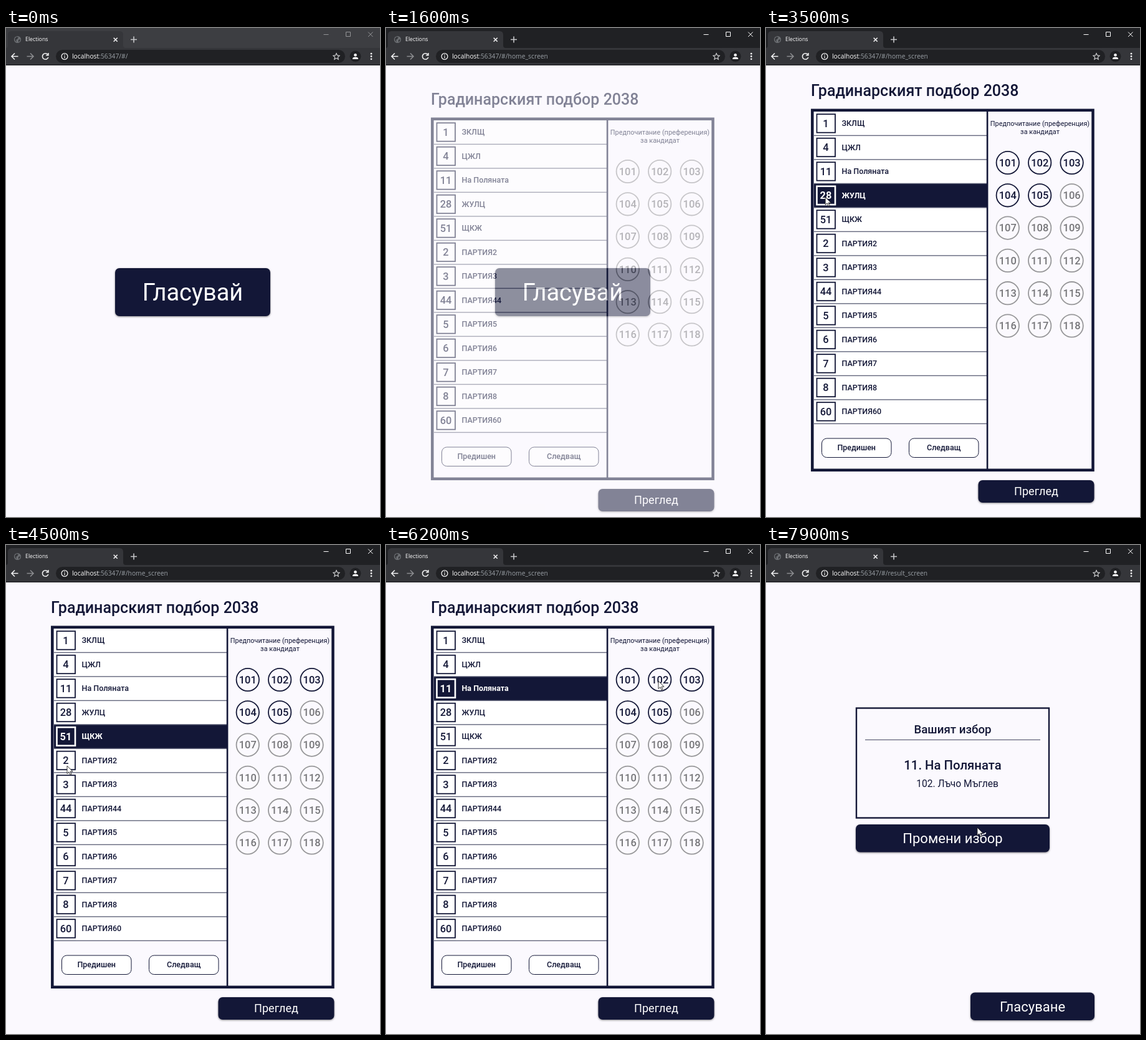
Recreate the animation shown at these times as an HTML page. Size 600 by 784 pixels, loop 8 s.

```html
<!DOCTYPE html>
<html lang="bg">
<head>
<meta charset="utf-8">
<title>Elections</title>
<style>
html, body { margin: 0; width: 100%; height: 100%; overflow: hidden; background: #fbf9fe; }
svg { display: block; width: 600px; height: 784px; --navy: #131737; --bg: #fbf9fe; }
text { font-family: Roboto, sans-serif; fill: var(--navy); white-space: pre; }
.mid { text-anchor: middle; }
.medium { font-weight: 500; }
.page { fill: var(--bg); }
.button rect { fill: var(--navy); filter: drop-shadow(0 1px 1.5px #0007); }
.button text { fill: #fff; }
.outlined rect { fill: #fff; stroke: var(--navy); }
.row .back { fill: #fff; }
.row .box { fill: #fff; stroke: var(--navy); stroke-width: 1.8; }
.row.on .back { fill: var(--navy); }
.row.on .box { fill: var(--navy); stroke: #fff; stroke-width: 2.6; }
.row.on text { fill: #fff; font-weight: 700; }
.candidate circle { fill: none; stroke: #979799; stroke-width: 1.8; }
.candidate text { fill: #757578; }
.candidate.open circle { stroke: var(--navy); }
.candidate.open text { fill: var(--navy); }
.candidate.picked circle { fill: var(--navy); }
.candidate.picked text { fill: #fff; font-weight: 700; }
.chrome text { font-family: "Open Sans", sans-serif; fill: #fff; }
.icon { fill: none; stroke: #f1f1f2; stroke-width: 1.6; }
</style>
</head>
<body>
<svg id="stage" viewBox="0 0 600 784"></svg>
<script>
const rect = (x, y, w, h, attrs = '') =>
  `<rect x="${x}" y="${y}" width="${w}" height="${h}" ${attrs}/>`;
const text = (str, x, middle, size, cls = 'mid') =>
  `<text x="${x}" y="${middle + size * .355}" font-size="${size}" class="${cls}">${str}</text>`;
const icon = (d, attrs = '') => `<path class="icon" d="${d}" ${attrs}/>`;
const button = (label, x, y, w, h, size) =>
  `<g class="button">${rect(x, y, w, h, 'rx="7"')}${text(label, x + w / 2, y + h / 2, size)}</g>`;
const outlined = (label, x) =>
  `<g class="outlined">${rect(x, 658, 111.5, 30.5, 'rx="8"')}${text(label, x + 55.75, 673, 12.5, 'mid medium')}</g>`;
const page = (id, content) =>
  `<g id="${id}">${rect(0, 60, 600, 724, 'class="page"')}${content}</g>`;

const parties = [[1, 'ЗКЛЩ'], [4, 'ЦЖЛ'], [11, 'На Поляната'], [28, 'ЖУЛЦ'], [51, 'ЩКЖ'],
  ...[2, 3, 44, 5, 6, 7, 8, 60].map(n => [n, 'ПАРТИЯ' + n])];
const rowTop = i => 134 + 38.5 * i;

const rows = parties.map(([number, name], i) => {
  const y = rowTop(i);
  return `<g class="row">${rect(77, y, 277, 38.5, 'class="back"')}
    ${rect(81.5, y + 4.2, 29.5, 29.5, 'class="box"')}
    ${text(number, 96, y + 19, 16.4, 'mid medium')}
    ${text(name, 121.5, y + 19, 12.5, 'medium')}</g>`;
}).join('');
const separators = parties.map((_, i) =>
  rect(77, rowTop(i + 1) - .8, 277, 1.4, 'fill="#63667c"')).join('');

const candidates = Array.from({ length: 18 }, (_, i) => {
  const x = 387.8 + 51.4 * (i % 3), y = 216 + 52.3 * Math.floor(i / 3);
  return `<g class="candidate"><circle cx="${x}" cy="${y}" r="18.2"/>${text(101 + i, x, y, 16.5, 'mid medium')}</g>`;
}).join('');

const startPage = page('start', button('Гласувай', 175, 385, 249, 77, 38));

const homePage = page('home', `
  ${text('Градинарският подбор 2038', 72, 100.2, 25, 'medium')}
  ${rows}${separators}
  ${rect(74.3, 131.8, 450.2, 577, 'fill="none" stroke="var(--navy)" stroke-width="4.5"')}
  ${rect(353.8, 132, 2.6, 577, 'fill="var(--navy)"')}
  ${text('Предпочитание (преференция)', 439.5, 153.5, 10.9)}
  ${text('за кандидат', 439.5, 166, 10.9)}
  ${candidates}
  ${outlined('Предишен', 89.5)}${outlined('Следващ', 229.5)}
  ${button('Преглед', 340.5, 725, 186, 36, 18.1)}
  <circle id="ripple" cx="419" cy="740" fill="#fff" fill-opacity=".14" clip-path="url(#review)"/>`);

const resultPage = page('result', `
  ${rect(145, 261.5, 309, 176, 'fill="none" stroke="var(--navy)" stroke-width="2.4"')}
  ${text('Вашият избор', 299.5, 295.5, 18.7, 'mid medium')}
  ${rect(159, 311.8, 281, 1.2, 'fill="#5d5f76"')}
  ${text('11. На Поляната', 299.5, 352.5, 20.3, 'mid medium')}
  ${text('102. Лъчо Мъглев', 307, 382, 15.6)}
  ${button('Промени избор', 144, 448, 311, 44.5, 22)}
  ${button('Гласуване', 328, 717.5, 199, 44.5, 22)}`);

const browser = `<g class="chrome">
  ${rect(0, 0, 600, 33, 'id="titlebar"')}
  <path d="M0 32Q3 32 3 28V11Q3 5 9 5H182Q188 5 188 11V28Q188 32 192 32H600V60H0Z" fill="#35363a"/>
  ${rect(0, 58.8, 600, 1.2, 'fill="#1d1d20"')}
  <circle cx="18.5" cy="18.5" r="5.6" fill="#6b6e72"/>
  <path d="M14 17l3-3 3 1-2 3-2 1 1 3-2-1zM20 19l3-1-1 3-2 2z" fill="#35363a"/>
  ${text('Elections', 31, 18.2, 8.8, '')}
  ${icon('M172.7 15.7l6 6m0-6l-6 6')}
  ${icon('M200 18.5h10m-5-5v10', 'style="stroke:#c5c6c8"')}
  <g id="controls" fill="none">
    <path d="M509.5 10.5h8M545.5 6.5h7v7h-7zM581 6.5l7.5 7.5m0-7.5l-7.5 7.5"/>
  </g>
  ${icon('M19.5 45.5H9m5-5l-5 5 5 5')}
  ${icon('M33.5 45.5H44m-5-5l5 5-5 5', 'style="stroke:#8b8c8f"')}
  ${icon('M67 42.5A4.8 4.8 0 1 0 67.8 47M67.9 40v3.7h-3.7')}
  ${rect(80, 35, 464, 21, 'rx="10.5" fill="#202124"')}
  <circle cx="94" cy="45.5" r="4.9" class="icon" style="stroke-width:1.3"/>
  ${icon('M94 45v3.2M94 42.6v1.4', 'style="stroke-width:1.3"')}
  <text x="106" y="49.2" font-size="10.3">localhost<tspan fill="#9aa0a6">:56347/#/<tspan id="route"></tspan></tspan></text>
  ${icon('M530 40.6l1.5 3.3 3.6.4-2.7 2.4.8 3.6-3.2-1.9-3.2 1.9.8-3.6-2.7-2.4 3.6-.4z', 'style="stroke:#d5d6d8;stroke-width:1.1"')}
  <circle cx="560.5" cy="45.5" r="9" fill="#202124"/>
  <circle cx="560.5" cy="43.2" r="2.3" fill="#fff"/>
  <path d="M556 50v-1q0-2.5 4.5-2.5t4.5 2.5v1z" fill="#fff"/>
  ${[41.2, 45.5, 49.8].map(y => `<circle cx="586" cy="${y}" r="1.4" fill="#f1f1f2"/>`).join('')}
</g>`;

const stage = document.getElementById('stage');
stage.innerHTML = `<clipPath id="review">${rect(340.5, 725, 186, 36, 'rx="7"')}</clipPath>
  ${startPage}${homePage}${resultPage}${browser}
  <path id="cursor" d="M0 0V12.5L3 9.8 5 14.5 7 13.6 5 9.2H9Z" fill="#fff" stroke="#222" stroke-width=".9"/>`;

const $ = id => document.getElementById(id);
const rowNodes = [...stage.querySelectorAll('.row')];
const candidateNodes = [...stage.querySelectorAll('.candidate')];
const clamp = v => Math.min(1, Math.max(0, v));

// CSS-style cubic Bezier, solved by bisection
const bezier = (x1, y1, x2, y2) => x => {
  const at = (a, b, u) => 3 * a * u * (1 - u) ** 2 + 3 * b * u * u * (1 - u) + u ** 3;
  let lo = 0, hi = 1;
  for (let i = 0; i < 20; i++) {
    const u = (lo + hi) / 2;
    if (at(x1, x2, u) < x) lo = u; else hi = u;
  }
  return at(y1, y2, hi);
};
const fastOutSlowIn = bezier(.4, 0, .2, 1), easeIn = bezier(.42, 0, 1, 1);

const LOOP = 8000, FOCUS = 1300, OPEN = 1400, PICK = 6300, REVIEW = 7220, FADE = 300;
const selections = [[0, -1], [2300, 2], [3200, 3], [3800, 4], [5200, 2]];
const cursorPath = [
  [1700, 330, 425], [2150, 92, 231], [2700, 92, 231], [3150, 95, 268], [3450, 95, 268],
  [3750, 97, 308], [4300, 97, 308], [4500, 98, 354], [4900, 105, 452], [5180, 112, 236],
  [5300, 112, 236], [5600, 437, 218], [6400, 437, 218], [6900, 419, 740],
  [7550, 419, 740], [7900, 339, 453], [LOOP, 339, 453]];

function cursorAt(t) {
  const i = Math.max(1, cursorPath.findIndex(p => p[0] > t));
  const [t0, x0, y0] = cursorPath[i - 1], [t1, x1, y1] = cursorPath[i];
  const k = clamp((t - t0) / (t1 - t0)), e = k * k * (3 - 2 * k);
  return [x0 + (x1 - x0) * e, y0 + (y1 - y0) * e];
}

function showPage(id, progress) {
  const node = $(id), k = clamp(progress);
  node.setAttribute('opacity', k === 1 ? 1 : k && easeIn(k));
  node.setAttribute('transform', `translate(0 ${k === 1 ? 0 : 181 * (1 - fastOutSlowIn(k))})`);
}

function draw(t) {
  const active = t >= FOCUS;
  $('titlebar').setAttribute('fill', active ? '#202124' : '#3d3e42');
  $('controls').setAttribute('stroke', active ? '#fff' : '#939497');
  $('route').textContent = t < OPEN ? '' : t < REVIEW ? 'home_screen' : 'result_screen';

  const leaving = (t - REVIEW) / FADE;
  showPage('home', leaving > 0 ? 1 - leaving : (t - OPEN) / FADE);
  showPage('result', leaving);

  const selected = selections.filter(s => s[0] <= t).pop()[1];
  rowNodes.forEach((node, i) => node.classList.toggle('on', i === selected));
  candidateNodes.forEach((node, i) => {
    node.classList.toggle('open', selected >= 0 && i < 5);
    node.classList.toggle('picked', t >= PICK && i === 1);
  });
  $('ripple').setAttribute('r', Math.max(0, (t - 7150) * .49));

  $('cursor').setAttribute('visibility', t < cursorPath[0][0] ? 'hidden' : 'visible');
  $('cursor').setAttribute('transform', `translate(${cursorAt(t)})`);
}

const begin = performance.now();
function tick() {
  draw((performance.now() - begin) % LOOP);
  requestAnimationFrame(tick);
}
tick();
</script>
</body>
</html>
```
